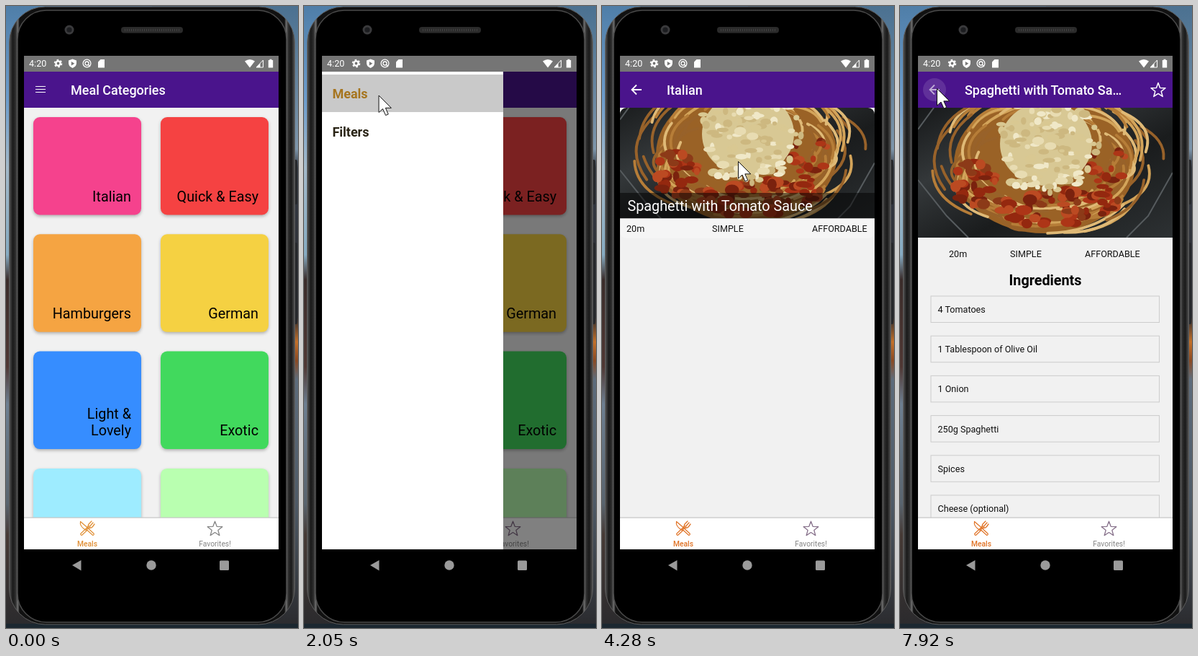
Recreate the animation shown at these times as an HTML page. Size 406 by 862 pixels, loop 8000 ms.

```html
<!DOCTYPE html>
<html lang="en">
<head>
<meta charset="utf-8">
<title>Meals app</title>
<style>
  html, body { margin: 0; width: 100%; height: 100%; overflow: hidden; background: #000; }
  svg { display: block; width: 406px; height: 862px; font-family: Roboto, "Liberation Sans", sans-serif; }
  .title { font-size: 18px; font-weight: 500; fill: #fff; }
  .big { font-size: 19.8px; }
  .body { font-size: 12.6px; fill: #111; }
  .tab { font-size: 10.3px; text-anchor: middle; }
  .item { font-size: 18px; font-weight: 700; }
  .card { filter: drop-shadow(0 2px 2px rgba(0, 0, 0, .28)); }
  .line { fill: none; stroke-linecap: round; stroke-linejoin: round; }
</style>
</head>
<body>
<svg viewBox="0 0 406 862">
  <defs>
    <linearGradient id="wallL" x2="0" y2="1">
      <stop stop-color="#4f7ea8"/><stop offset=".15" stop-color="#6c9ccc"/>
      <stop offset=".26" stop-color="#a3b9c9"/><stop offset=".4" stop-color="#86abc2"/>
      <stop offset=".44" stop-color="#3a2c2a"/><stop offset=".58" stop-color="#503834"/>
      <stop offset=".64" stop-color="#6d7f91"/><stop offset=".8" stop-color="#59646e"/>
      <stop offset=".85" stop-color="#463a35"/><stop offset="1" stop-color="#2a2a2d"/>
    </linearGradient>
    <linearGradient id="wallR" x2="0" y2="1">
      <stop stop-color="#4b7191"/><stop offset=".23" stop-color="#7d95aa"/>
      <stop offset=".26" stop-color="#343a44"/><stop offset=".5" stop-color="#2b2b30"/>
      <stop offset=".54" stop-color="#c2702a"/><stop offset=".57" stop-color="#8a4a24"/>
      <stop offset=".6" stop-color="#5d6c7c"/><stop offset=".8" stop-color="#4e5a66"/>
      <stop offset="1" stop-color="#2a2a2d"/>
    </linearGradient>
    <linearGradient id="rim">
      <stop stop-color="#555"/><stop offset=".012" stop-color="#1a1a1a"/><stop offset=".022" stop-color="#2c2c2c"/>
      <stop offset=".03" stop-color="#6e6e6e"/><stop offset=".036" stop-color="#111"/>
      <stop offset=".964" stop-color="#111"/><stop offset=".97" stop-color="#6e6e6e"/>
      <stop offset=".978" stop-color="#2c2c2c"/><stop offset=".988" stop-color="#1a1a1a"/><stop offset="1" stop-color="#555"/>
    </linearGradient>
    <linearGradient id="plate" x2="1" y2="1">
      <stop stop-color="#17191a"/><stop offset=".3" stop-color="#34383a"/>
      <stop offset=".6" stop-color="#1a1c1d"/><stop offset="1" stop-color="#2d3133"/>
    </linearGradient>
    <clipPath id="stack"><rect x="25" y="91" width="354" height="618"/></clipPath>
    <clipPath id="glass"><rect x="25" y="91" width="354" height="662"/></clipPath>
    <clipPath id="photoBox"><rect width="354" height="180"/></clipPath>
    <clipPath id="mealBox"><path d="M25 294V150a9 9 0 0 1 9-9H370a9 9 0 0 1 9 9V294Z"/></clipPath>
    <clipPath id="cardBox"><rect x="38" y="154" width="150" height="136" rx="9"/></clipPath>
    <clipPath id="clip2"><rect id="reveal2" x="25" y="91" width="354" height="618"/></clipPath>
    <clipPath id="clip3"><rect id="reveal3" x="25" y="91" width="354" height="618"/></clipPath>
    <g id="photo" clip-path="url(#photoBox)"></g>
  </defs>

  <!-- desktop and phone body -->
  <rect width="203" height="862" fill="url(#wallL)"/>
  <rect x="203" width="203" height="862" fill="url(#wallR)"/>
  <rect y="856" width="406" height="6" fill="#1b2730"/>
  <rect x="400" y="213" width="5" height="62" rx="2" fill="#26282b"/>
  <rect x="400" y="328" width="5" height="113" rx="2" fill="#26282b"/>
  <rect x="4.5" y="1" width="397" height="856" rx="50" fill="url(#rim)" stroke="#5e5e5e"/>
  <rect x="16" y="6" width="374" height="848" rx="40" fill="#000" stroke="#4a4a4a" stroke-width="1.5"/>
  <circle cx="88" cy="33" r="6.5" fill="#3a3a3c"/><circle cx="88" cy="33" r="3.6" fill="#1c1d20"/>
  <rect x="160" y="29" width="86" height="8.5" rx="4" fill="#2b2b2b"/>
  <path d="M165 33.2H242" stroke="#444" stroke-width="3" stroke-dasharray="1 2"/>
  <g fill="#9a9a9a">
    <path d="M92 775L104.5 768V782.5Z"/><circle cx="202" cy="775" r="6.7"/>
    <rect x="297" y="768.5" width="13" height="13.5" rx="1.5"/>
  </g>

  <!-- screens -->
  <g clip-path="url(#stack)">
    <g id="screen1"></g>
    <rect id="dim1" x="25" y="91" width="354" height="618"/>
    <g id="wrap2" clip-path="url(#clip2)"><g id="screen2"></g></g>
    <rect id="dim2" x="25" y="91" width="354" height="618"/>
    <g id="wrap3" clip-path="url(#clip3)"><g id="screen3"></g></g>
  </g>
  <g id="tabs"></g>
  <g clip-path="url(#glass)">
    <rect id="shade" x="25" y="91" width="354" height="662"/>
    <g id="drawer">
      <rect x="25" y="91" width="252" height="662" fill="#fff"/>
      <rect id="row" x="25" y="95" width="252" height="52"/>
      <text class="item" x="39.4" y="127.5" fill="#a6751f">Meals</text>
      <text class="item" x="39.4" y="180.5" fill="#2a2416">Filters</text>
    </g>
  </g>

  <!-- status bar -->
  <rect x="25" y="69" width="354" height="22" fill="#757575"/>
  <g fill="#fff">
    <text x="32" y="84" font-size="12.6">4:20</text>
    <circle cx="72.5" cy="79.5" r="3.1" fill="none" stroke="#fff" stroke-width="2.4"/>
    <circle cx="72.5" cy="79.5" r="4.9" fill="none" stroke="#fff" stroke-width="1.8" stroke-dasharray="2.6 2.53"/>
    <path d="M92.5 73.5L98 75.5V79.5Q97.500 84 92.500 86Q87.500 84 87 79.500V75.500Z"/>
    <path d="M90.800 77L95.300 79.800L90.800 82.500Z" fill="#757575"/>
    <g fill="none" stroke="#fff" stroke-width="1.3">
      <circle cx="112.500" cy="79.500" r="5.400"/><circle cx="112.500" cy="79.500" r="2.500"/>
      <path d="M114 81L117 84"/>
    </g>
    <path d="M131.500 74H137V85.500H128V77.500Z"/>
    <path d="M339 85.500L332 76.500Q339 71.500 346 76.500Z"/>
    <path d="M348 85L357.500 75V85Z" fill="none" stroke="#fff"/><path d="M348 85L353.500 79.500V85Z"/>
    <path d="M364.800 75H366.500V73.800H369.500V75H371.200V85.500H364.800Z"/>
  </g>

  <path id="cursor" d="M0 0V23.500L5.500 18.500L9.500 27.500L13.200 26L9.300 17.300H17.300Z" fill="#fff" stroke="#111" stroke-linejoin="round"/>
</svg>
<script>
const LOOP = 8000, HEIGHT = 618;
const $ = id => document.getElementById(id);
const set = (id, attrs) => { for (const k in attrs) $(id).setAttribute(k, attrs[k]); };
const text = (x, y, cls, s, anchor = 'start') =>
  `<text x="${x}" y="${y}" class="${cls}" text-anchor="${anchor}">${s}</text>`;
const rect = (x, y, w, h, fill, extra = '') =>
  `<rect x="${x}" y="${y}" width="${w}" height="${h}" fill="${fill}" ${extra}/>`;

function star(cx, cy, r) {
  let d = '';
  for (let i = 0; i < 10; i++) {
    const a = i * Math.PI / 5, q = i % 2 ? r * .42 : r;
    d += (i ? 'L' : 'M') + (cx + q * Math.sin(a)).toFixed(2) + ' ' + (cy - q * Math.cos(a)).toFixed(2);
  }
  return d + 'Z';
}

const header = title => rect(25, 91, 354, 50, '#4a148c') + text(90, 123, 'title', title);
const ripple = id => `<circle id="${id}" cx="48" cy="116" r="15" fill="#fff" opacity="0"/>`;
const arrow = (id = '') =>
  `<path ${id && `id="${id}"`} d="M55 116H42M48 109.500L41.500 116L48 122.500" fill="none" stroke="#fff" stroke-width="1.800"/>`;
const details = (xs, y) =>
  ['20m', 'SIMPLE', 'AFFORDABLE'].map((s, i) => text(xs[i], y, 'body', s)).join('');

function buildPhoto() {
  let seed = 11;
  const rnd = () => (seed = seed * 16807 % 2147483647) / 2147483647;
  const pick = list => list[Math.floor(rnd() * list.length)];
  let s = rect(0, 0, 354, 180, 'url(#plate)') +
    '<path d="M0 100L40 150L70 180M354 90L320 150L290 180M0 30L22 0" stroke="#565b5e" stroke-width="2" fill="none"/>' +
    '<ellipse cx="176" cy="78" rx="126" ry="96" fill="#9a6226"/>';
  for (let i = 0; i < 90; i++) {
    const a = rnd() * 6.283, b = a + .4 + rnd() * .6, k = .62 + rnd() * .42;
    const at = (u, m) => `${(176 + 146 * m * Math.cos(u)).toFixed(1)} ${(72 + 98 * m * Math.sin(u)).toFixed(1)}`;
    s += `<path class="line" d="M${at(a, k)}Q${at((a + b) / 2, k * 1.15)} ${at(b, k * (.85 + rnd() * .25))}" ` +
      `stroke="${pick(['#d3a45a', '#b67d38', '#dfb976', '#98622a'])}" stroke-width="3.800"/>`;
  }
  const blobs = (n, cx, cy, rx, ry, size, colors) => {
    for (let i = 0; i < n; i++) {
      const a = rnd() * 6.283, q = Math.sqrt(rnd());
      s += `<ellipse cx="${(cx + rx * q * Math.cos(a)).toFixed(1)}" cy="${(cy + ry * q * Math.sin(a)).toFixed(1)}" ` +
        `rx="${(size * (.5 + rnd())).toFixed(1)}" ry="${(size * (.4 + rnd() * .6)).toFixed(1)}" fill="${pick(colors)}"/>`;
    }
  };
  const sauce = ['#94280f', '#ad3517', '#7a220e', '#bb4a22', '#8c3a18'];
  blobs(34, 78, 105, 30, 32, 8, sauce);
  blobs(60, 190, 138, 85, 28, 8, sauce);
  blobs(26, 262, 95, 32, 45, 7, sauce);
  s += '<ellipse cx="178" cy="50" rx="64" ry="58" fill="#d8c894"/>';
  blobs(130, 178, 52, 74, 68, 6, ['#e8dcb2', '#d9c892', '#f0e8c8', '#cdb880']);
  $('photo').innerHTML = s;
}

function buildScreens() {
  const cards = [['Italian', '#f5428d'], ['Quick &amp; Easy', '#f54242'], ['Hamburgers', '#f5a442'], ['German', '#f5d142'],
    ['Light &amp;|Lovely', '#368dff'], ['Exotic', '#41d95d'], ['', '#9eecff'], ['', '#b9ffb0']];
  $('screen1').innerHTML = rect(25, 91, 354, 618, '#f1f1f1') + header('Meal Categories') +
    '<path d="M41 111.500H55M41 115.500H55M41 119.500H55" stroke="#fff"/>' + ripple('menuRipple') +
    cards.map(([name, color], i) => {
      const x = 38 + i % 2 * 177, y = 154 + (i >> 1) * 162.3;
      const lines = name.split('|');
      return rect(x, y, 150, 135.5, color, 'rx="9" class="card"') +
        lines.map((s, j) => text(x + 136, y + 116.500 - (lines.length - 1 - j) * 23.500, 'big', s, 'end')).join('');
    }).join('') +
    '<g clip-path="url(#cardBox)"><circle id="cardRipple" cx="158" cy="220"/></g>';

  $('screen2').innerHTML = rect(25, 91, 354, 618, '#f1f1f1') + header('Italian') + arrow() +
    '<g id="meal">' + rect(25, 141, 354, 181, '#f5f5f5', 'rx="9"') +
    '<g clip-path="url(#mealBox)"><use id="photo2" href="#photo" x="25" y="127.500"/></g>' +
    rect(25, 259, 354, 35.500, '#000', 'opacity=".5"') +
    '<g fill="#fff">' + text(35.5, 284, 'big', 'Spaghetti with Tomato Sauce') + '</g>' +
    details([34, 153, 292], 313) + '</g>';

  const foods = ['4 Tomatoes', '1 Tablespoon of Olive Oil', '1 Onion', '250g Spaghetti', 'Spices', 'Cheese (optional)'];
  $('screen3').innerHTML = rect(25, 91, 354, 618, '#f1f1f1') + header('Spaghetti with Tomato Sa…') +
    ripple('backRipple') + arrow('backArrow') +
    `<path d="${star(359, 117, 10.5)}" class="line" stroke="#fff" stroke-width="1.500"/>` +
    '<use id="photo3" href="#photo" x="25" y="141"/>' + details([68, 153, 257], 348) +
    '<g font-weight="700">' + text(202, 387, 'big', 'Ingredients', 'middle') + '</g>' +
    foods.map((s, i) => rect(43, 402 + i * 55.2, 317.5, 36.5, 'none', 'stroke="#ccc"') +
      text(52.5, 425 + i * 55.2, 'body', s)).join('') +
    rect(375.5, 141, 3.500, 305, '#777', 'id="bar"');

  // hollow cutlery handles: a thick coloured stroke with a thin white core
  const handle = d => `<path class="line" d="${d}" stroke="currentColor" stroke-width="3.800"/>` +
    `<path class="line" d="${d}" stroke="#fff" stroke-width="1.500"/>`;
  $('tabs').innerHTML = rect(25, 709, 354, 44, '#fff') + rect(25, 708.5, 354, 1.2, '#c6c6c6') +
    '<g id="tabMeals"><g transform="translate(102.500 713)">' +
    handle('M2.500 19L13 9') + handle('M11.500 12.500L18.500 19') +
    '<path class="line" d="M1 1.500C0 6 3 10 8.500 13.500L11.500 10.500Z" fill="#fff" stroke="currentColor" stroke-width="1.200"/>' +
    '<path class="line" d="M12 9.500Q11 6 13.500 4L16.500 1M14.500 7.500L18.500 3M13 10Q16 11 18 8.500L20.500 5" stroke="currentColor" stroke-width="1.300"/></g>' +
    '<g fill="currentColor" font-weight="500">' + text(113, 749, 'tab', 'Meals') + '</g></g>' +
    `<path id="tabStar" class="line" d="${star(290.5, 725, 10.8)}" stroke-width="1.300"/>` +
    '<g fill="#858585">' + text(290.5, 749, 'tab', 'Favorites!') + '</g>';
}

const clamp = v => Math.max(0, Math.min(1, v));
const ramp = (t, a, b) => clamp((t - a) / (b - a));

// cubic-bezier(.35, .45, 0, 1)
function ease(x) {
  if (x <= 0 || x >= 1) return clamp(x);
  let lo = 0, hi = 1, s = .5;
  for (let i = 0; i < 24; i++) {
    s = (lo + hi) / 2;
    if (1.05 * s * (1 - s) ** 2 + s ** 3 < x) lo = s; else hi = s;
  }
  return 1.35 * s * (1 - s) ** 2 + 3 * s * s * (1 - s) + s ** 3;
}

// critically damped spring, 1 falling to 0
const spring = ms => { const k = Math.max(0, ms) * .019; return Math.exp(-k) * (1 + k); };

const path = [[120, 271, 758], [205, 200, 400], [290, 149, 195], [520, 149, 195], [850, 52, 111], [1060, 51, 109],
  [1450, 51, 109], [1900, 98, 124], [2200, 109, 123], [2290, 109, 123], [2780, 156, 216], [3500, 156, 216],
  [4130, 187, 225], [4280, 189, 215], [5060, 189, 215], [5700, 210, 444], [6460, 210, 444], [6600, 206, 488],
  [7230, 54, 147], [7300, 54, 147], [7640, 51, 114], [8000, 51, 114]];

function cursorAt(t) {
  const i = path.findIndex(p => p[0] > t), [t0, x0, y0] = path[i - 1], [t1, x1, y1] = path[i];
  const u = (t - t0) / (t1 - t0);
  return `translate(${x0 + (x1 - x0) * u + .5} ${y0 + (y1 - y0) * u + .5})`;
}

// The upper screen is uncovered from the bottom while the lower one drifts up and darkens.
function push(t, start, lower, upper) {
  const p = t < start + 40 ? 0 : ease((t - start) / 425), rest = (1 - p) * HEIGHT;
  set('screen' + lower, { transform: `translate(0 ${-.02 * HEIGHT * p})` });
  set('dim' + lower, { opacity: .1 * clamp(p / .36) });
  set('reveal' + upper, { y: 91 + rest });
  set('screen' + upper, { transform: `translate(0 ${.041 * rest})` });
  set('wrap' + upper, { visibility: p > 0 ? 'visible' : 'hidden' });
}

function draw(t) {
  push(t, 3315, 1, 2);
  if (t >= 5000) push(t, 5015, 2, 3);
  else { set('dim2', { opacity: 0 }); set('wrap3', { visibility: 'hidden' }); }

  const open = t < 1205 ? 0 : t < 2120 ? 1 - spring(t - 1140) : spring(t - 2120);
  set('drawer', { transform: `translate(${-252 * (1 - open)} 0)`, visibility: open > .002 ? 'visible' : 'hidden' });
  set('shade', { opacity: .5 * open });
  set('row', { fill: t < 2045 ? '#f4f4f4' : '#c9c9c9' });

  set('menuRipple', { opacity: .16 * ramp(t, 900, 1000) * (1 - ramp(t, 1210, 1400)), r: 8 + 8 * ramp(t, 900, 1050) });
  set('cardRipple', { opacity: .13 * ramp(t, 2880, 2930) * (1 - ramp(t, 3000, 3135)), r: 20 + 130 * ramp(t, 2880, 3060) });
  set('backRipple', { opacity: .12 * ramp(t, 7740, 7850), r: 8 + 8 * ramp(t, 7740, 7900) });
  set('backArrow', { opacity: 1 - .4 * ramp(t, 7740, 7900) });

  set('meal', { opacity: 1 - .8 * ramp(t, 4560, 4680) * (1 - ramp(t, 5060, 5300)) });
  set('photo2', { opacity: ramp(t, 3650, 3950) });
  set('photo3', { opacity: ramp(t, 5280, 5580) });
  set('bar', { opacity: .55 * (1 - ramp(t, 6430, 6680)) });

  const early = t < 1210;
  set('tabMeals', { color: early ? '#e08f35' : '#e07326' });
  set('tabStar', { stroke: early ? '#858585' : '#86708a' });
  set('cursor', t < 120 ? { visibility: 'hidden' } : { visibility: 'visible', transform: cursorAt(t) });
}

buildPhoto();
buildScreens();
const begin = performance.now();
function tick() {
  draw((performance.now() - begin) % LOOP);
  requestAnimationFrame(tick);
}
tick();
</script>
</body>
</html>
```
